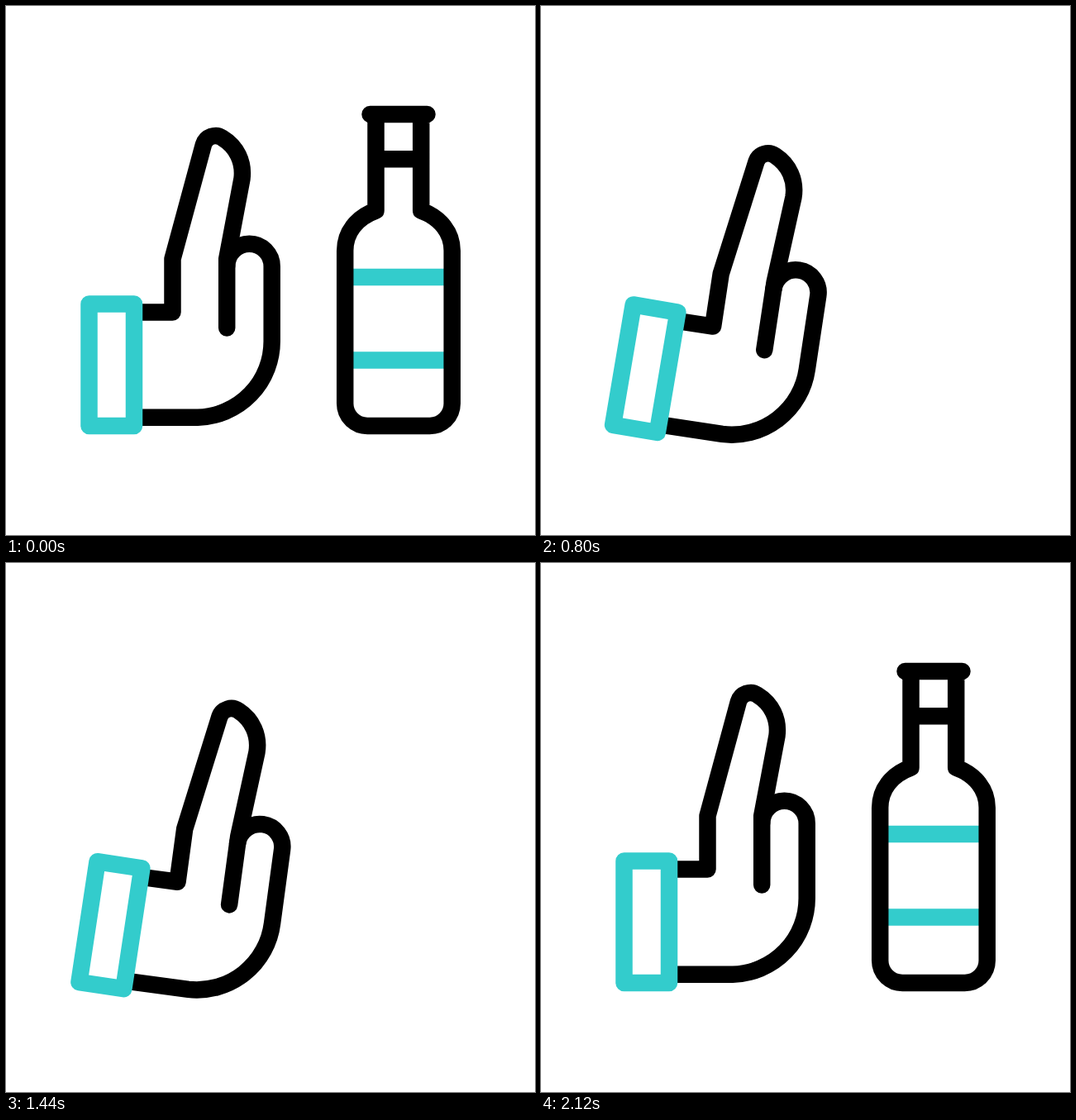
These frames come from a looping animation (640 by 640 pixels, 2200 ms). An HTML page:

```html
<!DOCTYPE html>
<html lang="en">
<head>
<meta charset="utf-8">
<title>Refusing the bottle</title>
<style>
  html, body { margin: 0; width: 100%; height: 100%; overflow: hidden; background: #fff; }
  svg { display: block; width: 100vw; height: 100vh; }
  path, rect { fill: none; stroke: #000; stroke-width: 20.5; stroke-linecap: round; stroke-linejoin: round; }
  .accent { stroke: #3cc; }
</style>
</head>
<body>
<svg viewBox="0 0 640 640">
  <clipPath id="glass"><path d="M410 240H540V510H410Z"/></clipPath>
  <g id="bottle">
    <g clip-path="url(#glass)">
      <rect id="label" class="accent" x="395" y="328" width="160" height="100.5"/>
    </g>
    <path d="M447.5 131V247.5C424 256 410.2 274 410.2 296V481A27 27 0 0 0 437.2 508H512.7A27 27 0 0 0 539.7 481V296C539.7 274 525.5 256 502.2 247.5V131M440.5 131H509.5M447.5 185.3H502.2"/>
  </g>
  <g id="hand">
    <path id="finger"/>
    <path d="M267.2 315A27.2 27.2 0 0 1 321.7 315V405A92 92 0 0 1 232 497.7H155"/>
  </g>
  <rect id="cuff" class="accent" x="100.5" y="360.5" width="54.5" height="147.5" style="fill:#fff"/>
  <path id="rays" class="accent"/>
</svg>
<script>
  const LOOP = 2200, STEP = 40;
  const el = id => document.getElementById(id);
  const [bottle, label, hand, finger, cuff, rays] =
    ['bottle', 'label', 'hand', 'finger', 'cuff', 'rays'].map(el);

  const clamp = x => Math.min(1, Math.max(0, x));
  const progress = (t, from, to) => clamp((t - from) / (to - from));
  const ease = (t, from, to) => {
    const x = progress(t, from, to);
    return x * x * (3 - 2 * x);
  };

  // Damped wave of the wrist: [time, degrees]
  const swing = [[200, 0], [600, -11.8], [880, 14.9], [1200, -8.6], [1480, 9.6], [1760, 0]];

  function swingAt(t) {
    let angle = 0;
    for (let i = 1; i < swing.length; i++) {
      const [t0, a0] = swing[i - 1], [t1, a1] = swing[i];
      angle += (a1 - a0) * ease(t, t0, t1);
    }
    return angle;
  }

  function fingerPath(bend) {
    const rad = bend * Math.PI / 180, c = Math.cos(rad), s = Math.sin(rad);
    const p = (x, y) => {
      const dx = x - 214, dy = y - 304;
      return `${214 + dx * c - dy * s} ${304 + dx * s + dy * c} `;
    };
    return 'M155 370.5H201.5V306L' + p(239, 167.5) + 'A15 15 0 0 1 ' + p(261.5, 159.5) +
      'C' + p(279, 170) + p(288, 188.5) + p(285.5, 209) + 'L267.2 306V389.5';
  }

  function drawHand(t) {
    const a = swingAt(t), back = a < 0;
    cuff.setAttribute('transform', `rotate(${a} 100.5 427.5)`);
    hand.setAttribute('transform', back ? `rotate(${a * 1.2} 110.5 440)` : `rotate(${a * 0.895} 91 423)`);
    finger.setAttribute('d', fingerPath(a * (back ? 1.48 : -0.67)));
  }

  // Each ray: start point and full extent
  const rayLines = [[334, 303, 54, -38], [335.5, 331.3, 78.5, 0.2], [334, 363.5, 42.5, 32.5]];

  function drawRays(t) {
    const head = ease(t, 360, 560), tail = ease(t, 560, 760);
    rays.setAttribute('d', head === 0 || tail === 1 ? '' : rayLines.map(([x, y, dx, dy]) =>
      `M${x + dx * tail} ${y + dy * tail}L${x + dx * head} ${y + dy * head}`).join(''));
  }

  function drawBottle(t) {
    const leaving = t < 1000;
    const x = leaving ? 250 * ease(t, 320, 640) : 0;
    const y = leaving ? 0 : 540 * (1 - progress(t, 1480, 1900)) ** 2.6;
    const stretch = 1 + 0.136 * (ease(t, 1480, 1800) - ease(t, 1900, 2120));
    const slide = leaving ? 180 * ease(t, 320, 480) : -160 * (1 - ease(t, 1600, 1880));
    const away = t >= 640 && t <= 1480;
    bottle.setAttribute('visibility', away ? 'hidden' : 'visible');
    bottle.setAttribute('transform', `translate(${x} ${y + 488 * (1 - stretch)}) scale(1 ${stretch})`);
    label.setAttribute('transform', `translate(${slide})`);
  }

  function draw(t) {
    drawHand(t);
    drawRays(t);
    drawBottle(t);
  }

  const start = performance.now();
  function tick() {
    const t = (performance.now() - start) % LOOP;
    draw(Math.floor(t / STEP) * STEP);
    requestAnimationFrame(tick);
  }
  tick();
</script>
</body>
</html>
```
